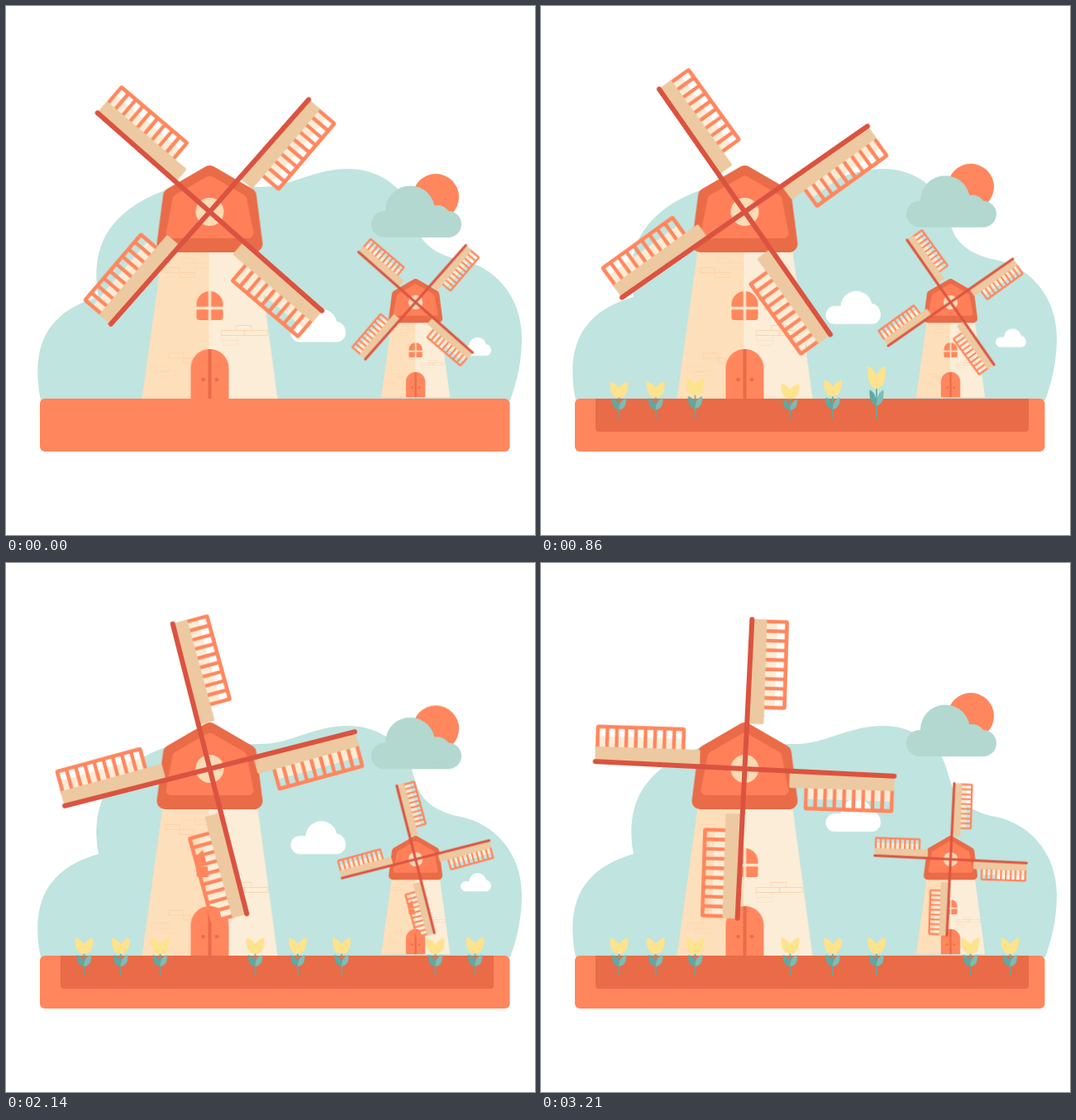
An HTML page for the animation above (3280 ms loop, 640 by 640 pixels).

```html
<!DOCTYPE html>
<html lang="en">
<head>
<meta charset="utf-8">
<title>Windmills</title>
<style>
  html, body { margin: 0; width: 100%; height: 100%; overflow: hidden; background: #fff; }
  svg { display: block; width: 100vw; height: 100vh; }

  .sails, .drift { animation: 3280ms steps(46) -4ms infinite; }
  .sails { animation-name: turn; }
  .drift { animation-name: rise; }
  .soil {
    transform-origin: 0 475px;
    animation: dig 3280ms linear -4ms infinite;
  }

  @keyframes turn {
    from { transform: rotate(-48.6deg); }
    to { transform: rotate(3.95deg); }
  }
  @keyframes rise {
    from { transform: translateY(0); }
    to { transform: translateY(var(--rise)); }
  }
  @keyframes dig {
    from, 1.5% { transform: scaleY(0); }
    6.5%, to { transform: scaleY(1); }
  }
</style>
</head>
<body>
<svg viewBox="0 0 640 640">
  <path fill="#c0e4df" d="M42 477C34 438 38 404 60 381C74 366 92 358 112 352C106 322 110 293 124 272
    C140 248 170 229 200 221L300 219C345 221 368 197 414 197C446 197 468 213 481 229
    C491 242 492 258 499 274C507 292 526 302 550 307C590 315 624 350 624 402C624 430 618 455 610 477Z"/>

  <g class="drift" style="--rise:-47px">
    <circle cx="520" cy="231" r="28" fill="#ff865d"/>
    <g fill="#b2d8d0">
      <rect x="442" y="248" width="109" height="32" rx="16"/>
      <circle cx="489" cy="247.5" r="30"/>
      <circle cx="522" cy="257" r="16"/>
    </g>
  </g>
  <g id="clouds" fill="#fff"></g>
  <g id="mills"></g>

  <rect x="41" y="475" width="568.5" height="64" rx="6" fill="#ff865d"/>
  <path class="soil" fill="#e96b47" d="M66 475H590V511a4 4 0 0 1-4 4H70a4 4 0 0 1-4-4Z"/>
  <g id="flowers"></g>
</svg>

<script>
const LOOP = 3280, STEPS = 46;
const $ = id => document.getElementById(id);
const repeat = (n, fn) => Array.from({ length: n }, (_, i) => fn(i)).join('');

// White clouds: left edge, bottom edge, scale, rise
const cloud = (x, y, s, rise) => `
  <g class="drift" style="--rise:${rise}px"><g transform="translate(${x} ${y}) scale(${s})">
    <rect y="-22" width="66.5" height="22" rx="11"/>
    <circle cx="37" cy="-21" r="19"/>
    <circle cx="54" cy="-13" r="12"/>
  </g></g>`;
$('clouds').innerHTML = cloud(344.5, 406.5, 1, -83.3) + cloud(550, 423, .555, -39.5);

// One sail pointing up, with the hub at the origin; the lattice leans slightly
const sail = i => `
  <g transform="rotate(${i * 90 - 1})">
    <rect x="18" y="-179" width="16" height="104" fill="#fcecd6"/>
    <path fill="none" stroke="#ff865d" stroke-width="4.4" d="${repeat(8, n => `M18 ${-179 + (n + 1) * 104 / 9}H45`)}"/>
    <rect x="18" y="-179" width="27.6" height="104" rx="1" fill="none" stroke="#ff865d" stroke-width="4.6"/>
    <rect x="2" y="-181.5" width="19.3" height="127" rx="2" fill="#ecc9a0"/>
  </g>`;

const brick = ([x, y, w]) => `<rect x="${x}" y="${y}" width="${w}" height="6"/>`;
const bold = [[-53.5, 67.5, 17], [-36, 73.5, 18], [-50, 171, 18], [-32, 177, 9],
  [32, 137.5, 18], [42, 143.5, 28], [14, 143.5, 28]];
const faint = [[-34, 56, 16], [-18, 62, 16], [-70, 187, 20], [-60, 193, 18], [14, 149.5, 20], [16, 155.5, 17]];

const house = (color, apex, sx, sy, bx, by, r) => `
  <path fill="${color}" stroke="${color}" stroke-width="${r * 2}" stroke-linejoin="round"
    d="M0 ${apex}L${sx} ${sy}L${bx} ${by}H${-bx}L${-sx} ${sy}Z"/>`;

const mill = (x, y, s) => `
  <g transform="translate(${x} ${y}) scale(${s})">
    <path fill="#fedfbb" d="M-56 40H0V226H-82Z"/>
    <path fill="#fcedd8" d="M-1 40H57L82 226H-1Z"/>
    <g fill="none" stroke="#fbcfa3">
      <g stroke-width="1" opacity=".75">${bold.map(brick).join('')}</g>
      <g stroke-width=".8" opacity=".4">${faint.map(brick).join('')}</g>
    </g>
    <path fill="#ff865d" d="M-16 128V112a16 16 0 0 1 32 0V128a3 3 0 0 1-3 3H-13a3 3 0 0 1-3-3Z"/>
    <path stroke="#fde5c8" stroke-width="3.4" d="M0 95V132M-17 116.5H17"/>
    <path fill="#ff865d" d="M-23 226V189a23 23 0 0 1 46 0V226Z"/>
    <path stroke="#e96b47" stroke-width="4" d="M0 166.5V226"/>
    <circle cx="-8" cy="203" r="2.3" fill="#e96b47"/>
    <circle cx="8.5" cy="203" r="2.3" fill="#e96b47"/>
    ${house('#e96b47', -46, 46.5, -19, 54, 39, 10)}
    ${house('#ff7f59', -37.5, 39, -15, 47, 26, 6)}
    <circle r="17" fill="#fadbb5"/>
    <g class="sails">
      ${repeat(4, sail)}
      <path stroke="#db5340" stroke-width="6" stroke-linecap="round" d="M0-181V181M-181 0H181"/>
    </g>
  </g>`;
$('mills').innerHTML = mill(495.5, 358.5, .508) + mill(246.5, 249, 1);

// Tulips: x and the time each one sprouts
const tulips = [[94.5, 15], [138.8, 125], [186.5, 250], [301.5, 405],
  [353, 585], [406, 670], [519.5, 1245], [567.5, 1450]];

$('flowers').innerHTML = tulips.map(([x]) => `
  <g transform="translate(${x} 499)"><g class="tulip">
    <path stroke="#5fa9a3" stroke-width="1.6" d="M0 0V-27"/>
    <path fill="#5fa9a3" d="M0-11C-7-12-9-17-8.5-25Q-1-23 0-14Z"/>
    <path fill="#7cbdb6" d="M0-11C7-12 9-17 8.5-25Q1-23 0-14Z"/>
    <path fill="#fde38d" d="M0-26C-8-26-12-34-10.5-46Q-4-44 0-38Q4-44 10.5-46C12-34 8-26 0-26Z"/>
  </g></g>`).join('');

// Quick linear growth, then a damped swing about full height
function spring(t) {
  const grow = 60;
  if (t < grow) return Math.max(0, t / grow);
  const u = t - grow;
  return 1 + .65 * Math.exp(-.0039 * u) * Math.sin(u * 2 * Math.PI / 430);
}

document.querySelectorAll('.tulip').forEach((el, i) => {
  const frames = Array.from({ length: STEPS + 1 }, (_, k) => ({
    transform: `scaleY(${spring(k * LOOP / STEPS - tulips[i][1]).toFixed(4)})`,
    easing: 'step-end'
  }));
  el.animate(frames, { duration: LOOP, iterations: Infinity, delay: -4 });
});
</script>
</body>
</html>
```
